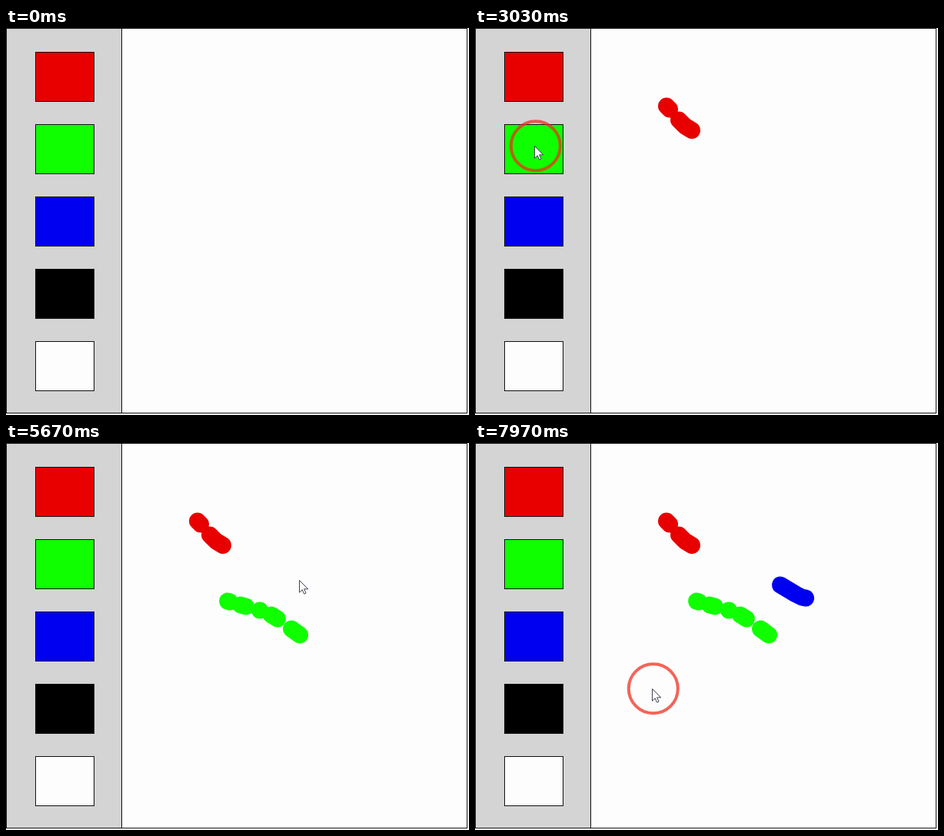
An HTML page with a canvas that plays this animation: 602 px wide and 503 px high, repeating every 8000 ms.

```html
<!DOCTYPE html>
<html lang="en">
<head>
<meta charset="utf-8">
<title>Paint program</title>
<style>
html, body { margin: 0; width: 100%; height: 100%; overflow: hidden; background: #fff; }
canvas { display: block; }
</style>
</head>
<body>
<canvas id="stage" width="602" height="503"></canvas>
<script>
const ctx = document.getElementById('stage').getContext('2d');
const LOOP_MS = 8000, FPS = 30, DAB = 11;
const PAPER = '#fdfdfd', PANEL = '#d4d4d4';

// Each act: go to a swatch, click it, go to the paper, press, drag, release. Times are in frames.
const acts = [
  { color: '#e80000', swatchY: 63, leave: 13, click: 29, press: 57, drag: 66, release: 72,
    from: [248, 102], to: [281, 133], paint: 'M249 101.5l4 4M265 119.5l8 8 9 5.5' },
  { color: '#10ff00', swatchY: 153, leave: 77, click: 91, press: 111, drag: 116, release: 128,
    from: [287, 205], to: [382, 249],
    paint: 'M288 205.5l3 1M305 210.5l7 2M330 217.5h.1M345 223.5l8 5M371 241.5l11 8' },
  { color: '#0000f0', swatchY: 262, leave: 135, click: 152, press: 175, drag: 180, release: 189,
    from: [381, 178], to: [431, 202], paint: 'M397 184.5l20 12 8 4 5 1' },
  { color: '#000', swatchY: 333, leave: 197, click: 219, press: 239, drag: 240, release: 240,
    from: [230, 319], to: [230, 319], paint: '' }
];
const paths = acts.map(act => new Path2D(act.paint));

const moves = [{ start: 0, end: 8, to: [243, 90] }].concat(...acts.map(act => [
  { start: act.leave, end: act.click - 4, to: [77, act.swatchY] },
  { start: Math.max(act.click + 5, act.press - 16), end: act.press - 5, to: act.from },
  { start: act.drag - 1, end: act.drag + 5, to: act.to }
]));

const arrow = new Path2D('M.5 .5V16.3L4.2 12.8 6.6 18.2 9 17.1 6.6 11.8H11.7Z');

const easeOut = u => 1 - (1 - u) ** 2;

function pointerAt(frame) {
  let [x, y] = [600, 240];
  for (const { start, end, to } of moves) {
    if (frame <= start) break;
    const part = easeOut(Math.min(1, (frame - start) / (end - start)));
    x += (to[0] - x) * part;
    y += (to[1] - y) * part;
  }
  return [x, y];
}

function isPressed(frame) {
  return acts.some(({ click, press, release }) =>
    (frame >= click && frame < click + 6) || (frame >= press && frame < release));
}

function box(x, y, w, h, fill) {
  ctx.fillStyle = fill;
  ctx.strokeStyle = '#111';
  ctx.lineWidth = 1;
  ctx.fillRect(x, y, w, h);
  ctx.strokeRect(x + .5, y + .5, w, h);
}

function drawWindow() {
  ctx.fillStyle = '#fff';
  ctx.fillRect(0, 0, 602, 503);
  box(0, 0, 599, 500, PAPER);
  box(0, 0, 150, 500, PANEL);
  [...acts.map(act => act.color), PAPER].forEach((color, i) => box(38, 31 + 94 * i, 76, 64, color));
}

// Paint shows only as far as the pointer has dragged it.
function drawPaint(frame, pointerX) {
  acts.forEach(({ color, drag }, i) => {
    if (frame < drag) return;
    ctx.save();
    ctx.beginPath();
    ctx.rect(0, 0, frame < drag + 5 ? pointerX + DAB : 602, 503);
    ctx.clip();
    ctx.lineWidth = 2 * DAB;
    ctx.lineCap = ctx.lineJoin = 'round';
    ctx.strokeStyle = color;
    ctx.stroke(paths[i]);
    ctx.restore();
  });
}

function drawPointer(x, y, pressed) {
  if (pressed) {
    ctx.beginPath();
    ctx.arc(x + 1.8, y + .3, 32, 0, 2 * Math.PI);
    ctx.lineWidth = 4;
    ctx.strokeStyle = 'rgba(240, 42, 28, .72)';
    ctx.stroke();
  }
  ctx.save();
  ctx.translate(Math.round(x), Math.round(y));
  ctx.fillStyle = '#fff';
  ctx.strokeStyle = '#445';
  ctx.lineWidth = 1;
  ctx.fill(arrow);
  ctx.stroke(arrow);
  ctx.restore();
}

function draw() {
  const time = performance.now() % LOOP_MS;
  const frame = Math.floor((time + 4) * FPS / 1000) % (LOOP_MS * FPS / 1000);
  const [x, y] = pointerAt(frame);
  drawWindow();
  drawPaint(frame, x);
  if (frame > 0) drawPointer(x, y, isPressed(frame));
  requestAnimationFrame(draw);
}
draw();
</script>
</body>
</html>
```
